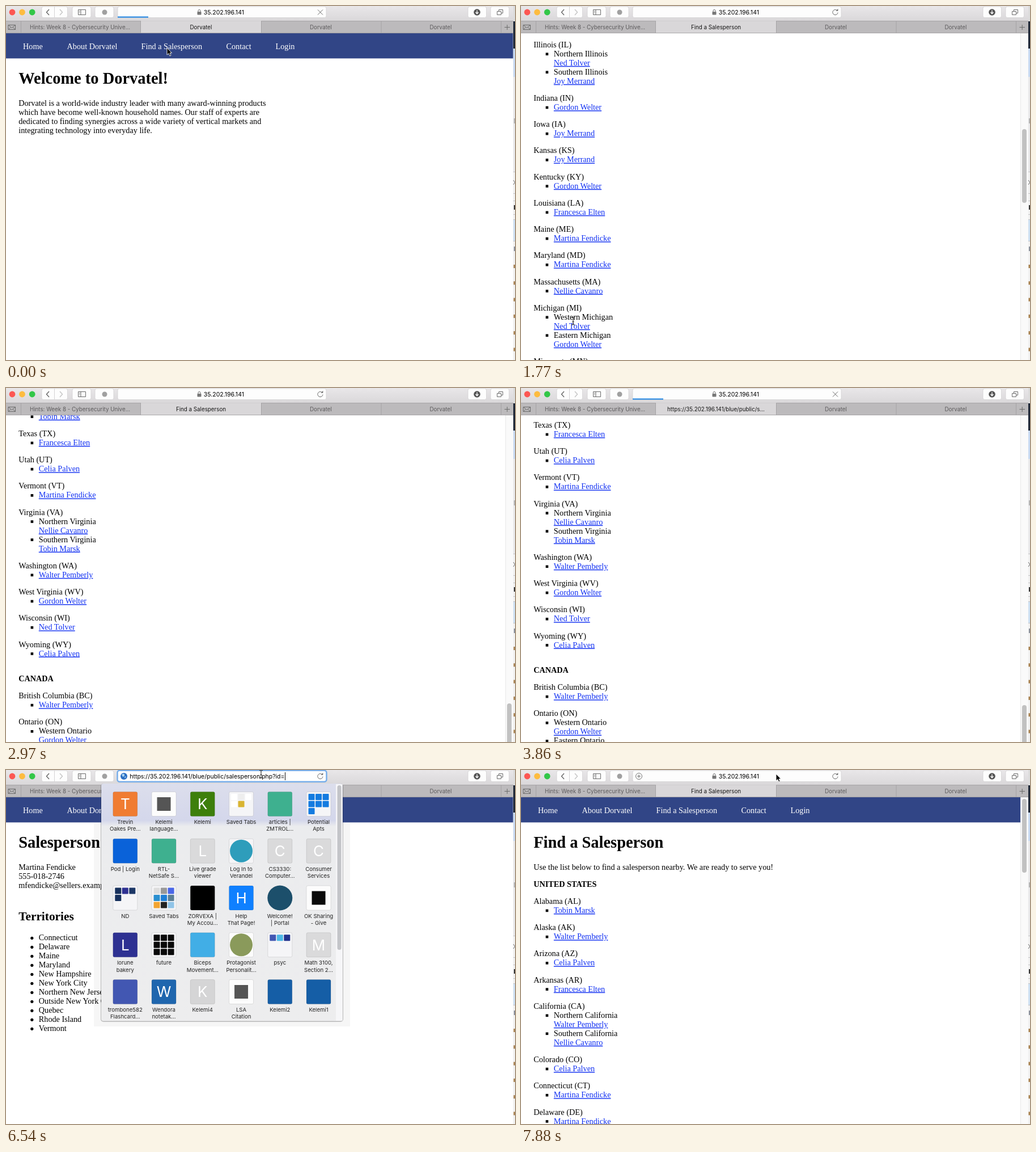
Animation of 898x624 px, one loop 8 s. Source, as an HTML page:

```html
<!DOCTYPE html>
<html lang="en">
<head>
<meta charset="utf-8">
<title>Browser session</title>
<style>
  html, body { margin: 0; width: 100%; height: 100%; overflow: hidden; background: #fff; }
  svg { display: block; }
  text { white-space: pre; }
  .page { font: 14.22px "Liberation Serif", "Times New Roman", serif; }
  .page .h1 { font-size: 28.44px; font-weight: bold; }
  .page .h2 { font-size: 21.33px; font-weight: bold; }
  .link { fill: #1130f2; text-decoration: underline; }
  .ui { font: 9.8px Inter, Roboto, sans-serif; }
  .url { font-size: 10.5px; }
  .label { font-size: 9.6px; fill: #222; }
  .letter { font-size: 26px; fill: #fff; }
  .mid { text-anchor: middle; }
  .line { fill: none; stroke: #6b6b6b; }
</style>
</head>
<body>
<svg id="stage" width="898" height="624" xmlns="http://www.w3.org/2000/svg"></svg>
<script>
const LOOP = 8000, STEP = 148.6;
const LINE = 16, GAP = 14.22;
const HOST = '35.202.196.141';
const ADDRESS = `https://${HOST}/blue/public/salesperson.php?id=`;
const BRAND = 'Dorvatel';

const text = (x, y, s, more = '') => `<text x="${x}" y="${y}" ${more}>${s}</text>`;
const rect = (x, y, w, h, fill, more = '') =>
  `<rect x="${x}" y="${y}" width="${w}" height="${h}" fill="${fill}" ${more}/>`;
const dot = (x, y, r, fill, more = '') => `<circle cx="${x}" cy="${y}" r="${r}" fill="${fill}" ${more}/>`;
const path = (d, more = 'class="line"') => `<path d="${d}" ${more}/>`;
const rows = (x, y, lines) => lines.map((s, i) => text(x, y + i * LINE, s)).join('');

// ---- pages ----
const nav = width => rect(0, 48, width, 44.4, '#314586') + '<g fill="#fff">' +
  [['Home', 30], ['About ' + BRAND, 107.6], ['Find a Salesperson', 238.6], ['Contact', 388.5], ['Login', 475.5]]
    .map(([s, x]) => text(x, 75.5, s)).join('') + '</g>';
const heading = s => text(22.2, 137, s, 'class="h1"');

const home = nav(895) + heading(`Welcome to ${BRAND}!`) + rows(22.2, 176, [
  `${BRAND} is a world-wide industry leader with many award-winning products`,
  'which have become well-known household names. Our staff of experts are',
  'dedicated to finding synergies across a wide variety of vertical markets and',
  'integrating technology into everyday life.'
]);

const territories = ['Connecticut', 'Delaware', 'Maine', 'Maryland', 'New Hampshire', 'New York City',
  'Northern New Jersey', 'Outside New York City', 'Quebec', 'Rhode Island', 'Vermont'];
const person = nav(895) + heading('Salesperson') +
  rows(22.2, 176, ['Martina Fendicke', '555-018-2746', 'mfendicke@sellers.example']) +
  text(22.2, 265, 'Territories', 'class="h2"') + rows(57.8, 300.3, territories) +
  territories.map((_, i) => dot(45.8, 296.3 + i * LINE, 2.6, '#000')).join('');

const reps = {
  T: 'Tobin Marsk', W: 'Walter Pemberly', C: 'Celia Palven', F: 'Francesca Elten', N: 'Nellie Cavanro',
  M: 'Martina Fendicke', G: 'Gordon Welter', J: 'Joy Merrand', E: 'Ned Tolver'
};
const states = `Alabama (AL):T|Alaska (AK):W|Arizona (AZ):C|Arkansas (AR):F
|California (CA):Northern California=W,Southern California=N|Colorado (CO):C|Connecticut (CT):M|Delaware (DE):M
|Florida (FL):Northern Florida=T,Southern Florida=N|Georgia (GA):T|Hawaii (HI):W|Idaho (ID):C
|Illinois (IL):Northern Illinois=E,Southern Illinois=J|Indiana (IN):G|Iowa (IA):J|Kansas (KS):J|Kentucky (KY):G
|Louisiana (LA):F|Maine (ME):M|Maryland (MD):M|Massachusetts (MA):N
|Michigan (MI):Western Michigan=E,Eastern Michigan=G|Minnesota (MN):E|Mississippi (MS):F|Missouri (MO):J
|Montana (MT):C|Nebraska (NE):J|Nevada (NV):C|New Hampshire (NH):M
|New Jersey (NJ):Northern New Jersey=M,Southern New Jersey=N|New Mexico (NM):C
|New York (NY):New York City=M,Outside New York City=M|North Carolina (NC):T|North Dakota (ND):J
|Ohio (OH):Northern Ohio=E,Southern Ohio=G|Oklahoma (OK):F|Oregon (OR):W
|Pennsylvania (PA):Western Pennsylvania=G,Eastern Pennsylvania=N|Rhode Island (RI):M|South Carolina (SC):T
|South Dakota (SD):J|Tennessee (TN):T|Texas (TX):F|Utah (UT):C|Vermont (VT):M
|Virginia (VA):Northern Virginia=N,Southern Virginia=T|Washington (WA):W|West Virginia (WV):G|Wisconsin (WI):E
|Wyoming (WY):C|CANADA|British Columbia (BC):W|Ontario (ON):Western Ontario=G,Eastern Ontario=N|Quebec (QC):M`;

let texasY = 0;
function buildList() {
  let y = 236, out = nav(881) + heading('Find a Salesperson') +
    text(22.2, 176, 'Use the list below to find a salesperson nearby. We are ready to serve you!') +
    text(22.2, 206, 'UNITED STATES', 'font-weight="bold"');
  for (const entry of states.split('|')) {
    const [name, areas] = entry.trim().split(':');
    if (!areas) {
      y += GAP;
      out += text(22.2, y, name, 'font-weight="bold"');
      y += LINE + GAP;
      continue;
    }
    if (name.startsWith('Texas')) texasY = y;
    out += text(22.2, y, name);
    for (const area of areas.split(',')) {
      const [region, rep] = area.includes('=') ? area.split('=') : ['', area];
      y += LINE;
      out += rect(43.6, y - 6.4, 4.6, 4.6, '#000');
      if (region) {
        out += text(57.8, y, region);
        y += LINE;
      }
      out += text(57.8, y, reps[rep], 'class="link"');
    }
    y += LINE + GAP;
  }
  return out;
}
const list = buildList();
const bottom = texasY - 70, middle = texasY - 336;

// ---- browser frame ----
const button = (x, w) => rect(x, 1, w, 19.5, '#fdfdfd', 'rx="3" stroke="#cfcdcf" stroke-width=".7"');
const chrome = rect(0, 0, 895, 27, 'url(#bar)') + rect(0, 26.5, 895, 21.5, '#bcbabc') +
  rect(238, 26.5, 212, 21.5, '#d9d7d9') +
  path('M0 26.5H238M450 26.5H895M0 47.6H895M26.5 27V48M237.5 27V48M450.5 27V48M662 27V48M873.5 27V48',
    'fill="none" stroke="#a3a1a3" stroke-width=".9"') +
  dot(11, 11, 5.4, '#fc5753') + dot(28.5, 11, 5.4, '#fdbc40') + dot(46.2, 11, 5.4, '#33c748') +
  button(63, 45.5) + path('M85.5 1V20', 'stroke="#d5d3d5"') +
  path('M76 6L71.5 11L76 16', 'class="line" stroke-width="1.5"') +
  path('M95 6L99.5 11L95 16', 'fill="none" stroke="#c4c4c4" stroke-width="1.4"') +
  button(117, 33) + path('M127.5 6.5H140.5V15.5H127.5ZM132 6.5V15.5M129 9H130.5M129 11H130.5') +
  button(157, 33) + dot(174, 11, 4.5, '#a0a0a0') +
  button(197, 368) + button(815, 32.5) + dot(831, 11, 5.8, '#555') +
  path('M831 7.5V13M828.5 11L831 13.8L833.5 11', 'fill="none" stroke="#fff" stroke-width="1.3"') +
  button(855, 32.5) + path('M866.5 9.5H873.5V15.5H866.5ZM869.5 9V6.5H876.5V12.5H874') +
  path('M4 33.5H16.5V41.5H4ZM4 33.5L10.2 38.5L16.5 33.5M4 41.5L8.5 37.5M16.5 41.5L12 37.5') +
  path('M879.5 37.5H889M884.2 33V42') +
  '<g fill="#5d5b5d" class="mid">' + text(130.5, 41, 'Hints: Week 8 - Cybersecurity Unive...') +
  text(555.5, 41, BRAND) + text(767, 41, BRAND) + '</g>';

// the strip of another window at the right edge
const edge = rect(894.6, 0, 4, 624, '#f1f1f1') + rect(894.6, 0, 4, 27, '#dcdcdc') +
  rect(895, 27, 3, 48, '#1d2636') + rect(895, 75, 3, 50, '#c9dbf3') + rect(895, 125, 3, 167, '#e9e9eb') +
  rect(895, 376, 3, 38, '#cfe1f3') +
  [292, 330, 343, 367, 376, 414].map(y => rect(895, y, 3, 1, '#c2c2c4')).join('') +
  rect(896, 198, 2, 9, '#b5b5b5') + rect(896, 351, 2, 8, '#333') + rect(896, 424, 2, 8, '#8a8f9a') +
  path('M895 307L898 311L895 315') +
  Array.from({ length: 6 }, (_, i) => rect(895.5, 456 + i * 29.3, 2.5, 6, '#a9814f')).join('');

// ---- favourites panel: label, fill, then a letter, an inner shape or small squares ----
const GREY = '#dadadb', WHITE = '#fcfcfc', FOLDER = '#f5f5f7';
const many = (n, c) => Array(n).fill(c);
const favourites = [
  ['Trevin/Oakes Pre...', '#f07c32', 'T'], ['Kelemi/language...', WHITE, { square: '#555' }], ['Kelemi', '#3d7f0b', 'K'],
  ['Saved Tabs', FOLDER, ['#fff', '#eee', '#fff', '#fff', '#d9b431']], ['articles |/ZMTROL...', '#3eb08f'],
  ['Potential/Apts', FOLDER, many(7, '#147be0')],
  ['Pod | Login', '#0a62d9'], ['RTL-/NetSafe S...', '#3eb08f'], ['Live grade/viewer', GREY, 'L'],
  ['Log In to/Verandel', FOLDER, { disc: '#2e9dbb' }], ['CS3330:/Computer...', GREY, 'C'], ['Consumer/Services', GREY, 'C'],
  ['ND', FOLDER, ['#16305c', '#2f3192', '#1c3766', '#16305c']],
  ['Saved Tabs', FOLDER, ['#ddd', '#999', '#4a67e8', '#2a8fd0', '#1f7fd6', '#5b7f95', '#f2a431', '#222', '#8fc4e8']],
  ['ZORVEXA |/My Accou...', '#000'], ['Help/That Page!', '#0f80ff', 'H'], ['Welcome!/| Portal', '', { disc: '#1c4f6b' }],
  ['OK Sharing/- Give', WHITE, { square: '#0a0a0a' }],
  ['lorune/bakery', '#2e3192', 'L'], ['future', FOLDER, many(9, '#0a0a0a')], ['Biceps/Movement...', '#41aee6'],
  ['Protagonist/Personalit...', WHITE, { disc: '#8a9a5b' }], ['psyc', FOLDER, ['#4257b2', '#4cb8e6', '#20308c']],
  ['Math 3100,/Section 2...', GREY, 'M'],
  ['trombone582/Flashcard...', '#4257b2'], ['Wendora/notetak...', '#1f66ae', 'W'], ['Kelemi4', '#d5d5d6', 'K'],
  ['LSA/Citation', WHITE, { square: '#555' }], ['Kelemi2', '#155ea6'], ['Kelemi1', '#155ea6']
];
function tile([label, fill, mark], i) {
  const x = 210.3 + (i % 6) * 68.25, y = 60 + Math.floor(i / 6) * 82.75;
  let out = fill ? rect(x - 21.5, y - 21.5, 43, 43, fill, 'rx="2.5" stroke="#000" stroke-opacity=".1"') : '';
  if (typeof mark === 'string') out += text(x, y + 9.4, mark, 'class="letter mid"');
  else if (Array.isArray(mark))
    out += mark.map((c, n) => rect(x - 18 + (n % 3) * 12.5, y - 18 + Math.floor(n / 3) * 12.5, 11, 11, c, 'rx="1"')).join('');
  else if (mark && mark.disc) out += dot(x, y, fill ? 20 : 22, mark.disc);
  else if (mark) out += rect(x - 12, y - 12, 24, 24, mark.square);
  return out + label.split('/').map((s, n) => text(x, y + 35 + n * 12.4, s, 'class="label mid"')).join('');
}
const panel = rect(155, 93, 452, 359, '#000', 'opacity=".035"') +
  rect(167, 24, 428, 420, '#000', 'rx="5" opacity=".25"') +
  rect(168, 24, 426, 418.5, 'url(#glass)', 'rx="4"') +
  '<g clip-path="url(#panelClip)">' + favourites.map(tile).join('') + '</g>' +
  rect(582, 25, 11.5, 417, '#f6f6f8') + rect(584.5, 27, 7, 290, '#c3c4c8', 'rx="3.5"');

const stage = document.getElementById('stage');
stage.innerHTML = `
<defs>
  <linearGradient id="bar" x2="0" y2="1"><stop stop-color="#e9e7e9"/><stop offset="1" stop-color="#d9d7d9"/></linearGradient>
  <linearGradient id="glass" x2="0" y2="1"><stop stop-color="#dcdeec"/><stop offset=".155" stop-color="#d4d7eb"/>
    <stop offset=".18" stop-color="#ebecee"/><stop offset="1" stop-color="#ededee"/></linearGradient>
  <clipPath id="view"><rect y="48" width="895" height="576"/></clipPath>
  <clipPath id="panelClip"><rect x="168" y="24" width="426" height="418.5"/></clipPath>
</defs>
${rect(0, 0, 898, 624, '#fff')}
<g class="page" clip-path="url(#view)">
  <g id="home">${home}</g><g id="person">${person}</g><g id="list">${list}</g>
</g>
<g id="scroller">${rect(881, 48, 13.6, 576, '#fafafa')}${rect(881, 48, 0.8, 576, '#e4e4e4')}
  ${rect(884, 51, 8, 130, '#c1c1c1', 'rx="4" id="thumb"')}</g>
${edge}
<g class="ui">${chrome}
  ${text(344, 41, '', 'id="title" class="mid" fill="#161616"')}
  <g id="idle">${rect(337.5, 10, 7, 5.5, '#777', 'rx=".8"')}${path('M339 10V8.5A2 2 0 0 1 343 8.5V10')}
    ${text(348.8, 14.8, HOST, 'class="url"')}</g>
  <g id="plus">${dot(208, 11, 5.5, 'none', 'stroke="#777"')}${path('M205 11H211M208 8V14')}</g>
  <g id="panel">${panel}</g>
  <g id="focus">${rect(196.5, 0.8, 369, 20, '#fff', 'rx="4" stroke="#78aeea" stroke-width="2.5"')}
    ${dot(208, 11, 6, '#2a6fc4')}${path('M204 8Q208 5 209 8T206 12ZM209 12L212 11L210 15Z', 'fill="#a9d3ef"')}
    ${rect(218, 3.5, 0, 14.5, '#b3d7ff', 'id="selection"')}
    ${text(218.3, 14.8, '', 'id="address" class="url"')}${rect(0, 4, 1, 14, '#111', 'id="caret"')}</g>
  <g id="reload">${path('M558 8.2A4.6 4.6 0 1 0 559 11.5')}${path('M555.5 8.7H559.3V4.8Z', 'fill="#6b6b6b"')}</g>
  <g id="loading">${path('M550 6.5L559 15.5M559 6.5L550 15.5')}${rect(197, 18.5, 54, 2, '#1a82e2')}</g>
</g>
${path('M0 0V12.2L2.9 9.6L4.9 14L7 13L5.1 8.8H8.7Z', 'id="arrow" fill="#000" stroke="#fff" stroke-width=".9"')}
${path('M-3 -6.5Q0 -6.5 0 -5V5.5Q0 7 -3 7M3 -6.5Q0 -6.5 0 -5M3 7Q0 7 0 5.5M-1.5 1.5H1.5',
  'id="beam" fill="none" stroke="#222" stroke-width="1.1"')}`;

const ui = {};
stage.querySelectorAll('[id]').forEach(node => ui[node.id] = node);
const show = (node, on) => node.setAttribute('visibility', on ? 'visible' : 'hidden');

// linear keyframes: [step, value, ...]
function along(keys, k, n = 1) {
  const i = keys.findIndex(key => key[0] > k);
  if (i < 0) return keys[keys.length - 1][n];
  if (i === 0) return keys[0][n];
  const a = keys[i - 1], b = keys[i];
  return a[n] + (b[n] - a[n]) * (k - a[0]) / (b[0] - a[0]);
}
const pointer = [[2, 284, 74], [5, 92, 555], [16, 92, 555], [22, 100, 670], [29, 100, 670],
  [32, 330, 455], [34, 447, 40], [35, 450, 7]];
const scrolling = [[9, 0], [11, bottom * 0.15], [14, bottom * 0.68], [16, middle], [19, bottom - 30], [21, bottom]];
const fading = [[35, 0], [37, 1], [45, 1], [47, 0.15], [48, 0]];

function draw(time) {
  const k = Math.floor((time + 15) / STEP);
  const within = (a, b) => k >= a && k < b;
  const page = k < 2 ? 'home' : within(27, 52) ? 'person' : 'list';
  const loading = k < 2 || within(25, 27) || within(50, 52);
  const focused = within(36, 50), selected = within(36, 40);

  for (const name of ['home', 'person', 'list']) show(ui[name], name === page);
  const y = k >= 52 ? 0 : along(scrolling, k);
  ui.list.setAttribute('transform', `translate(0 ${-y})`);
  ui.thumb.setAttribute('y', 51 + 508 * y / bottom);
  show(ui.scroller, page === 'list');

  const titles = { home: BRAND, list: 'Find a Salesperson', person: 'Salesperson: Martina Fendicke' };
  ui.title.textContent = k === 1 || k === 26 || k === 51 ? ADDRESS.slice(0, 36) + '...' : titles[page];

  show(ui.loading, loading);
  show(ui.reload, !loading);
  show(ui.idle, !focused);
  show(ui.focus, focused);
  ui.panel.setAttribute('opacity', along(fading, k));

  ui.address.textContent = ADDRESS + (k < 43 ? '7' : k < 45 ? '' : k < 46 ? '1' : '10');
  const width = ui.address.getComputedTextLength();
  ui.selection.setAttribute('width', selected ? width : 0);
  ui.caret.setAttribute('x', 218.8 + width);
  ui.caret.setAttribute('width', focused && !selected ? 1 : 0);

  const px = along(pointer, k), py = along(pointer, k, 2);
  const beam = within(5, 27) || focused;
  ui.arrow.setAttribute('transform', `translate(${px} ${py})`);
  ui.beam.setAttribute('transform', `translate(${px} ${py})`);
  show(ui.arrow, !beam);
  show(ui.beam, beam);
  show(ui.plus, py < 20 && !focused);
}

const start = performance.now();
function tick() {
  draw((performance.now() - start) % LOOP);
  requestAnimationFrame(tick);
}
tick();
</script>
</body>
</html>
```
